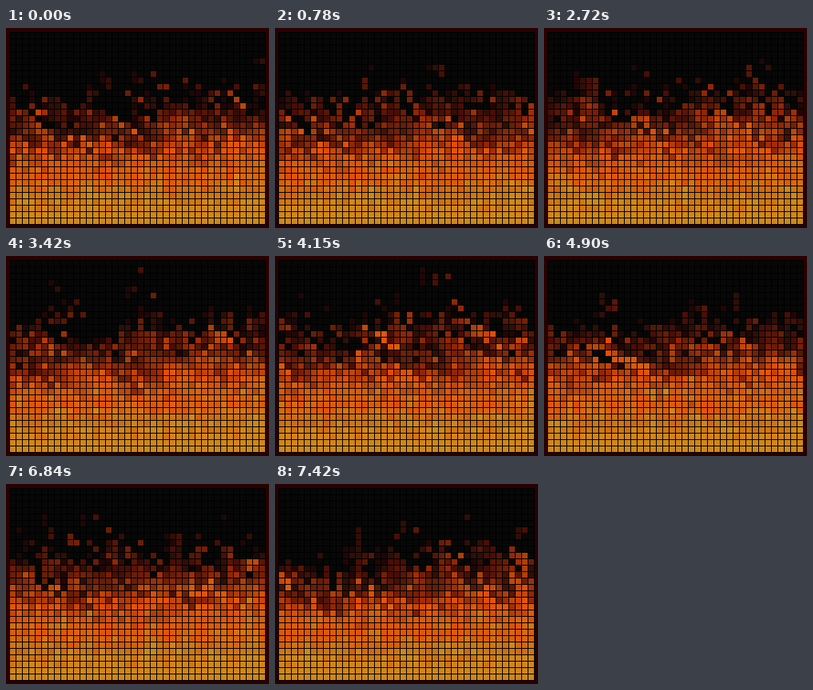
These frames come from a looping animation (329x250 px, 7.51 s). An HTML page with a canvas:

```html
<!DOCTYPE html>
<html lang="en">
<head>
<meta charset="utf-8">
<title>Pixel fire</title>
<style>
  html, body { margin: 0; width: 100%; height: 100%; overflow: hidden; background: #2a0000; }
  canvas { display: block; }
</style>
</head>
<body>
<canvas id="stage" width="329" height="250"></canvas>
<script>
const ctx = document.getElementById('stage').getContext('2d');
const LOOP = 7510, TICK = 50, WARMUP = 120;
const COLS = 40, ROWS = 30, PITCH = 8, CELL = 7, LEFT = 5, TOP = 6;
const SOURCE = 24;

// Colour per heat level; the hottest levels share the last gold.
const palette = ('070707 1f0707 2f0f07 470f07 571707 671f07 771f07 8f2707 9f2f07 af3f07 ' +
  'bf4707 c74707 df4f07 df5707 df5707 d75f07 d75f07 d7670f cf6f0f cf770f cf770f cf8717')
  .split(' ').map(hex => '#' + hex);

// Bursts of redraws: first time, last time, count.
const bursts = [
  [110, 350, 4], [560, 780, 4], [930, 1100, 3], [1290, 1510, 4], [1740, 2100, 6],
  [2290, 3030, 10], [3170, 3740, 8], [3880, 4150, 5], [4300, 4580, 5], [4860, 5560, 9],
  [5640, 5780, 3], [6220, 6300, 3], [6460, 6840, 5], [7020, 7260, 4], [7420, 7420, 1]
];
const times = [0];
for (const [first, last, count] of bursts) {
  for (let i = 0; i < count; i++) {
    const share = count > 1 ? i / (count - 1) : 0;
    times.push(Math.round((first + (last - first) * share) / 10) * 10);
  }
}

function seededRandom(seed) {
  return () => {
    seed = (seed + 0x6D2B79F5) | 0;
    let n = Math.imul(seed ^ (seed >>> 15), 1 | seed);
    n = (n + Math.imul(n ^ (n >>> 7), 61 | n)) ^ n;
    return ((n ^ (n >>> 14)) >>> 0) / 4294967296;
  };
}

const random = seededRandom(41);
const heat = new Uint8Array(COLS * ROWS);
heat.fill(SOURCE, COLS * (ROWS - 1));

// Heat rises one row per tick, cooling and drifting left by the same amount.
function spread() {
  for (let col = 0; col < COLS; col++) {
    for (let row = 0; row < ROWS - 1; row++) {
      const i = row * COLS + col;
      const decay = Math.floor(random() * 3);
      if (i >= decay) heat[i - decay] = Math.max(0, heat[i + COLS] - decay);
    }
  }
}

for (let i = 0; i < WARMUP; i++) spread();
let tick = 0;
const states = times.map(time => {
  while (tick < Math.round(time / TICK)) {
    spread();
    tick++;
  }
  return heat.slice();
});

function draw(state) {
  ctx.fillStyle = '#2a0000';
  ctx.fillRect(0, 0, 329, 250);
  ctx.fillStyle = '#000';
  ctx.fillRect(LEFT - 1, TOP - 1, COLS * PITCH + 1, ROWS * PITCH + 1);
  state.forEach((level, i) => {
    ctx.fillStyle = palette[Math.min(level, palette.length - 1)];
    ctx.fillRect(LEFT + (i % COLS) * PITCH, TOP + Math.floor(i / COLS) * PITCH, CELL, CELL);
  });
}

const start = performance.now();
let shown = -1;
function render() {
  const time = (performance.now() - start) % LOOP;
  let index = times.length - 1;
  while (times[index] > time) index--;
  if (index !== shown) draw(states[shown = index]);
  requestAnimationFrame(render);
}
render();
</script>
</body>
</html>
```
